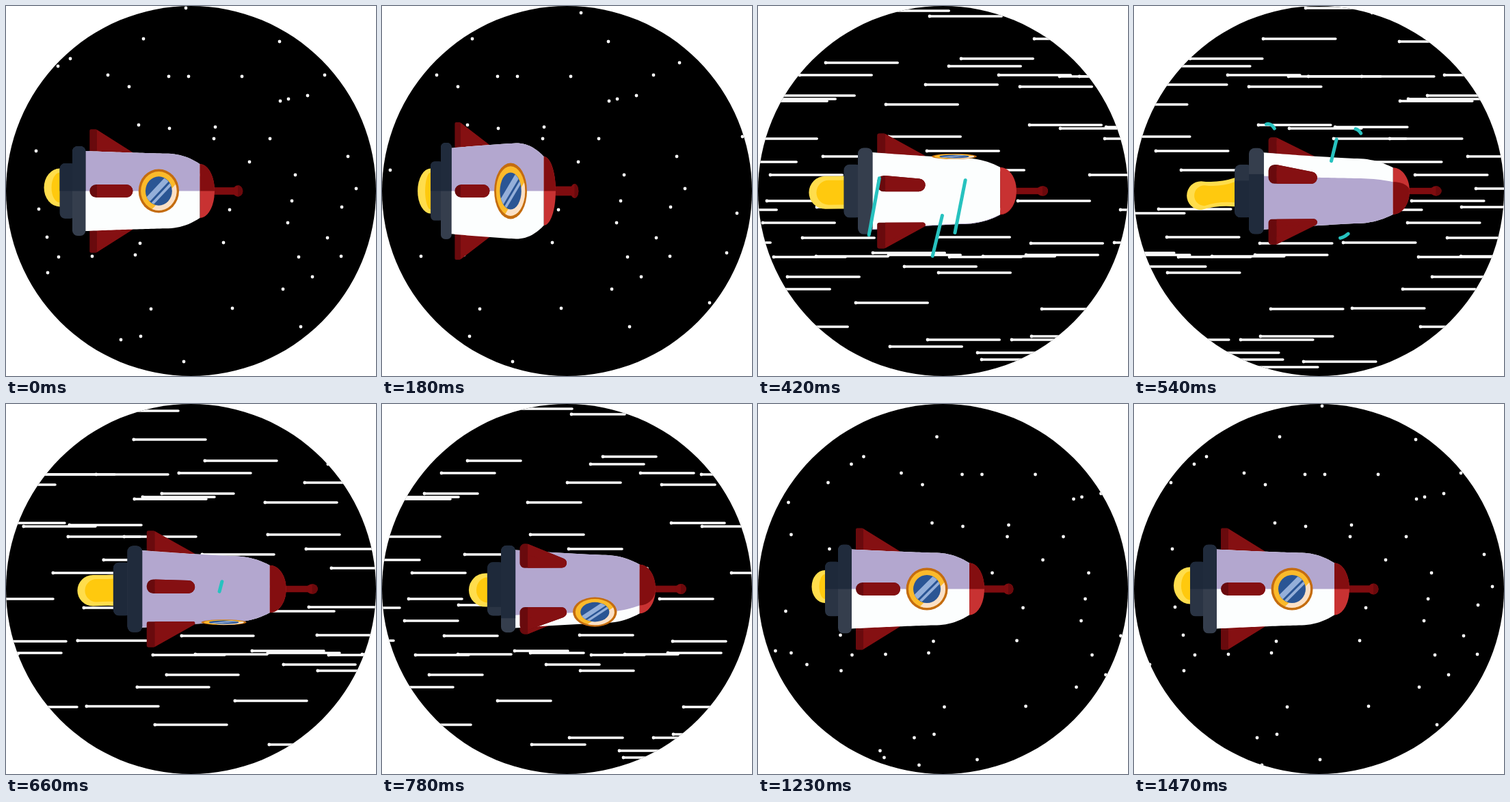
Recreate the animation shown at these times as an HTML page with a canvas. Size 541 by 541 pixels, loop 1.53 s.

```html
<!DOCTYPE html>
<html lang="en">
<head>
<meta charset="utf-8">
<title>Rocket</title>
<style>
html, body { margin: 0; width: 100%; height: 100%; overflow: hidden; background: #fff; }
canvas { display: block; width: 541px; height: 541px; }
</style>
</head>
<body>
<canvas id="stage" width="541" height="541"></canvas>
<script>
const ctx = document.getElementById('stage').getContext('2d');
const LOOP = 1530, STEP = 30, LAST = 49, FIELD = 608, MID = 270.5;
const RAD = Math.PI / 180, TAU = Math.PI * 2;

// x, y pairs; the field repeats every FIELD pixels
const STARS = [
  263,3, 201,48, 400,52, 94,77, 76,88, 149,101, 180,118, 238,103, 267,103, 345,103,
  466,101, 401,139, 413,136, 441,131, 194,174, 239,179, 306,177, 304,194, 386,194,
  500,220, 44,212, 356,228, 423,247, 512,267, 491,294, 48,297, 327,298, 412,317,
  60,338, 318,346, 196,347, 189,364, 470,339, 77,367, 126,366, 428,367, 490,366,
  61,390, 448,396, 405,414, 212,443, 331,442, 431,469, 197,483, 168,488, 260,520,
  360,10, 504,83, 596,191, 81,240, 418,285, 588,303, 573,361, 596,364, 548,434,
  42,115, 592,144, 282,247, 11,381, 45,488, 118,507, 124,517, 175,528, 177,285,
  579,7, 48,15, 598,498
];

// Keys are [step, value, slope]
const TRAVEL = [[0, 0, 11.5], [6, 69, 12], [14, 405, 53.7], [18, 620, 53.7],
  [26, 987, 36], [33, 1127, 7], [49, 1204, 12], [50, 1216, 11.5]];
const STREAK = [[8, 0], [11, 105], [21, 106], [26, 78, -13], [32, 0]];
const PLATE_X = [[0, 97, -3], [6, 86, -0.5], [14, 146, 8], [18, 168, 3],
  [26, 174, -3.5], [33, 137, -4], [49, 101, -3], [50, 97, -3]];
const STRETCH = [[0, 0.972, -0.035], [6, 0.785, -0.01], [14, 1.084, 0.008], [18, 1.098],
  [26, 1.056, -0.008], [33, 1, -0.004], [40, 1], [48, 1.005], [49, 1, -0.02], [50, 0.972, -0.03]];
const ROLL = [[7, 0], [14, 100, 25], [18, 203, 22], [26, 318, 9], [33, 353, 2], [40, 360]];
const FLAME_LEN = [[0, 23], [6, 19], [14, 51, 6], [18, 70], [26, 27, -4], [33, 15], [49, 24], [50, 23]];
const FLAME_H = [[0, 28], [6, 33], [14, 24], [18, 21], [26, 24.5], [33, 21], [49, 27], [50, 28]];
const FLAME_Y = [[0, -5], [6, 0], [14, 2], [26, 1.5], [33, -2], [49, -5]];

// Swooshes around the hull; angles in degrees at step 14, speeds per step
const SWOOSHES = [
  { x: 174, tilt: 18, r: 98, head: 11, hv: 25, tail: -41, tv: 31.5 },
  { x: 300, tilt: 18, r: 91, head: 10, hv: 25.5, tail: -42, tv: 34 },
  { x: 278, tilt: 24, r: 100, head: -21, hv: 17.5, tail: -72, tv: 24.5 },
  { x: 313, tilt: 18, r: 69, head: -199, hv: 26, tail: -235, tv: 29 }
];

function track(keys, k) {
  if (k <= keys[0][0]) return keys[0][1];
  for (let i = 1; i < keys.length; i++) {
    const [t0, v0, m0 = 0] = keys[i - 1], [t1, v1, m1 = 0] = keys[i];
    if (k > t1) continue;
    const d = t1 - t0, t = (k - t0) / d, t2 = t * t, t3 = t2 * t;
    return v0 * (2 * t3 - 3 * t2 + 1) + v1 * (3 * t2 - 2 * t3)
      + d * (m0 * (t3 - 2 * t2 + t) + m1 * (t3 - t2));
  }
  return keys[keys.length - 1][1];
}

function ellipse(x, y, rx, ry, color, from = 0, to = TAU) {
  ctx.fillStyle = color;
  ctx.beginPath();
  ctx.ellipse(x, y, rx, ry, 0, from, to);
  ctx.fill();
}

function clipped(region, draw) {
  ctx.save();
  ctx.beginPath();
  region();
  ctx.clip();
  draw();
  ctx.restore();
}

function drawStars(k) {
  const travel = track(TRAVEL, k), len = track(STREAK, k);
  ctx.fillStyle = ctx.strokeStyle = '#fff';
  ctx.lineWidth = 3.6;
  ctx.lineCap = 'round';
  for (let i = 0; i < STARS.length; i += 2) {
    const y = STARS[i + 1];
    const first = ((STARS[i] - travel) % FIELD + FIELD) % FIELD;
    for (const x of [first, first - FIELD]) {
      ctx.beginPath();
      ctx.arc(x, y, 2.4, 0, TAU);
      ctx.fill();
      if (len < 1) continue;
      ctx.beginPath();
      ctx.moveTo(x, y);
      ctx.lineTo(x + len, y);
      ctx.stroke();
    }
  }
}

function drawFlame(k, s) {
  const x = -19 * s, y = track(FLAME_Y, k);
  const len = track(FLAME_LEN, k), h = track(FLAME_H, k);
  const bend = Math.max(0, len - 50) * 0.4;
  const layer = (l, h, color) => {
    const rx = Math.min(l, h), cx = x - l + rx, cy = y + bend * 0.6;
    const mid = (x + cx) / 2;
    ctx.fillStyle = color;
    ctx.beginPath();
    ctx.moveTo(x + 6, y - h);
    ctx.lineTo(x, y - h);
    ctx.quadraticCurveTo(mid, y - h + bend, cx, cy - h);
    ctx.ellipse(cx, cy, rx, h, 0, -Math.PI / 2, Math.PI / 2, true);
    ctx.quadraticCurveTo(mid, y + h - bend * 0.3, x, y + h);
    ctx.lineTo(x + 6, y + h);
    ctx.fill();
  };
  layer(len, h, '#ffdd4c');
  layer(Math.max(3, len - 11), h - 6, '#ffc90e');
}

function drawRocket(k) {
  const s = track(STRETCH, k), roll = track(ROLL, k);
  const q = s ** -0.33, w = s ** -1.15;
  const sin = Math.sin(roll * RAD), cos = Math.cos(roll * RAD);
  const front = cos >= 0, seam = front ? -sin : sin;

  // Hull radius at a distance from the plate
  const radius = u => {
    if (u <= 140) {
      const t = (u - 20) / 120;
      return 58 * q + (53 * w - 58 * q) * t * (1.25 - 0.25 * t);
    }
    if (u <= 192) return w * (53 - 15 * ((u - 140) / 52) ** 2.2);
    return 38 * w * Math.sqrt(Math.max(0, 1 - ((u - 192) / 22) ** 2));
  };

  const band = (u0, u1, a, b, color) => {
    const n = 40;
    ctx.fillStyle = color;
    ctx.beginPath();
    for (let i = 0; i <= 2 * n + 1; i++) {
      const back = i > n, u = u0 + (u1 - u0) * (back ? 2 * n + 1 - i : i) / n;
      ctx.lineTo(u * s, radius(u) * (back ? b : a));
    }
    ctx.fill();
  };
  const hull = (u0, u1, light, dark) => {
    band(u0, u1, -1, 1, light);
    band(u0, u1, front ? -1 : seam, front ? seam : 1, dark);
  };

  const ring = (u0, u1, h, light, dark) => {
    const shape = () => ctx.roundRect(u0 * s, -h, (u1 - u0) * s, 2 * h, 8 * s);
    clipped(shape, () => {
      ctx.fillStyle = light;
      ctx.fillRect(-60, -h, 120, 2 * h);
      ctx.fillStyle = dark;
      if (front) ctx.fillRect(-60, -h, 120, h + seam * h);
      else ctx.fillRect(-60, seam * h, 120, h - seam * h);
    });
  };

  const fin = angle => {
    const up = -Math.sin(angle * RAD);
    const lw = 4 + 15 * Math.abs(Math.cos(angle * RAD)), in2 = lw / 2;
    const tip = 89 * s ** -0.5 - in2;
    const paint = color => {
      ctx.fillStyle = ctx.strokeStyle = color;
      ctx.lineWidth = lw;
      ctx.lineJoin = 'round';
      ctx.beginPath();
      ctx.moveTo(26 * s + in2, up * radius(26) * 0.9);
      ctx.lineTo(26 * s + in2, up * tip);
      ctx.lineTo(Math.max(35 * s, 26 * s + in2 + 1), up * tip);
      ctx.lineTo(91 * s - in2, up * radius(91) * 0.98);
      ctx.closePath();
      ctx.fill();
      ctx.stroke();
    };
    paint('#690a0d');
    clipped(() => ctx.rect(37 * s, -150, 120, 300), () => paint('#851012'));
  };
  const fins = near => {
    for (let i = 0; i < 4; i++) {
      const a = roll + i * 90;
      if ((Math.cos(a * RAD) > 0.03) === near) fin(a);
    }
  };

  ctx.save();
  ctx.translate(track(PLATE_X, k), MID);
  drawFlame(k, s);
  fins(false);

  ctx.fillStyle = '#7f0c0f';
  ctx.fillRect(210 * s, -5.2 * w, 39 * s, 10.4 * w);
  ellipse(249 * s, 0, 7.5 * s, 8 * w, '#7f0c0f');
  ellipse(249 * s, 0, 7.5 * s, 8 * w, '#6b090c', -Math.PI / 2, Math.PI / 2);

  hull(19, 192, '#fcfefe', '#b3a7cf');
  hull(192, 214, '#c83232', '#840e10');
  ring(-19, 5, 40 * q, '#2a3444', '#1e293a');
  ring(0, 20, 65 * q, '#353e4d', '#202b3c');

  if (cos > -0.25) drawWindow(130 * s, -radius(130) * sin * (front ? 1 : 1.05), s, Math.max(0.14, cos) * w);
  fins(true);
  ctx.restore();
}

function drawWindow(x, y, sx, sy) {
  ctx.save();
  ctx.translate(x, y);
  ctx.scale(sx, sy);
  ellipse(0, 0, 30.5, 31, '#c46c10');
  ellipse(0, 0, 27, 27.5, '#fbba2b');
  ellipse(0, 0, 27, 27.5, '#fbe0c6', -0.35, 1.95);
  ellipse(0, 0, 20, 20.5, '#2a5594');
  clipped(() => ctx.arc(0, 0, 20, 0, TAU), () => {
    ctx.rotate(-45 * RAD);
    ctx.fillStyle = '#94afd9';
    ctx.fillRect(-30, -7, 60, 8);
    ctx.fillRect(-30, 4, 60, 4);
  });
  ctx.restore();
}

function drawSwooshes(k) {
  ctx.strokeStyle = '#27c2bf';
  ctx.lineWidth = 5;
  ctx.lineCap = ctx.lineJoin = 'round';
  for (const l of SWOOSHES) {
    const from = Math.max(-115, l.tail + l.tv * (k - 14));
    const to = Math.min(112, l.head + l.hv * (k - 14));
    if (to <= from) continue;
    ctx.beginPath();
    for (let i = 0; i <= 16; i++) {
      const a = from + (to - from) * i / 16, up = Math.sin(a * RAD);
      ctx.lineTo(l.x + l.tilt * up + 0.5 * Math.max(0, Math.abs(a) - 82), MID - l.r * up);
    }
    ctx.stroke();
  }
}

function draw(now) {
  const k = Math.min(LAST, Math.floor(now % LOOP / STEP));
  ctx.fillStyle = '#fff';
  ctx.fillRect(0, 0, 541, 541);
  clipped(() => ctx.arc(MID, MID, MID, 0, TAU), () => {
    ctx.fillStyle = '#000';
    ctx.fillRect(0, 0, 541, 541);
    drawStars(k);
    drawRocket(k);
    drawSwooshes(k);
  });
}

let start;
function tick(now) {
  start ??= now;
  draw(Math.max(0, now - start));
  requestAnimationFrame(tick);
}
draw(0);
requestAnimationFrame(tick);
</script>
</body>
</html>
```
